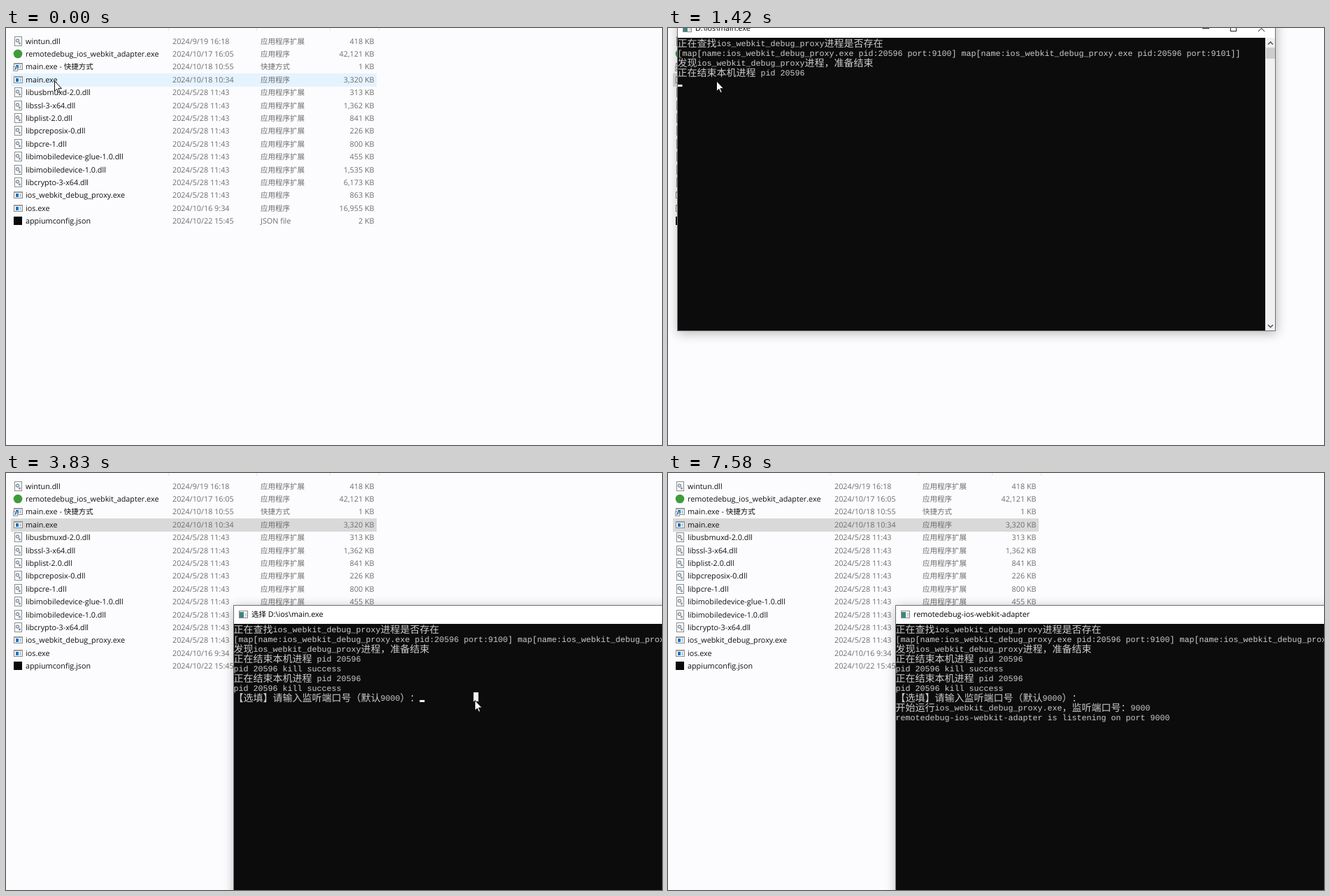
An HTML page with a canvas for the animation above (8 s loop, 938x597 px).

```html
<!DOCTYPE html>
<html lang="zh-CN">
<head>
<meta charset="utf-8">
<style>
html, body { margin: 0; width: 100%; height: 100%; overflow: hidden; background: #fcfcfe; }
canvas { display: block; }
</style>
</head>
<body>
<canvas id="stage" width="938" height="597"></canvas>
<script>
// All times are in ticks: 12 per second, 96 per loop.
const TICKS = 96, RATE = 12;
const OPEN = 14, GRAB = 28, DROP = 34, SELECT = 40, ENTER = 48, LAUNCH = 65;
const WIN_W = 856, WIN_H = 447, BAR_H = 27, CELL = 7, LINE = 14, PIVOT = 205;
const GRIP = [124, 16];
const LATIN = '"Open Sans", "Noto Sans", sans-serif';
const MONO = '"Liberation Mono", monospace';
const CJK = '"Noto Sans CJK SC", "Noto Sans CJK", sans-serif';

const stage = document.getElementById('stage').getContext('2d');
const buffer = document.createElement('canvas');
buffer.width = WIN_W;
buffer.height = WIN_H;
const pane = buffer.getContext('2d');
stage.textRendering = pane.textRendering = 'geometricPrecision';

// name | size in KB | date, if not the common one
const files = `wintun.dll|418|2024/9/19 16:18
remotedebug_ios_webkit_adapter.exe|42,121|2024/10/17 16:05
main.exe - 快捷方式|1|2024/10/18 10:55
main.exe|3,320|2024/10/18 10:34
libusbmuxd-2.0.dll|313
libssl-3-x64.dll|1,362
libplist-2.0.dll|841
libpcreposix-0.dll|226
libpcre-1.dll|800
libimobiledevice-glue-1.0.dll|455
libimobiledevice-1.0.dll|1,535
libcrypto-3-x64.dll|6,173
ios_webkit_debug_proxy.exe|863
ios.exe|16,955|2024/10/16 9:34
appiumconfig.json|2|2024/10/22 15:45`.split('\n').map(row => row.split('|'));

const types = { dll: '应用程序扩展', exe: '应用程序', json: 'JSON file', link: '快捷方式' };

const PROXY = 'ios_webkit_debug_proxy', KILL = '正在结束本机进程 pid 20596', DONE = 'pid 20596 kill success';
const ADAPTER = 'remotedebug-ios-webkit-adapter';
const entry = port => `map[name:${PROXY}.exe pid:20596 port:${port}]`;
const PROMPT = '【选填】请输入监听端口号（默认9000）：';

// [time printed, text]
const output = [
  [OPEN, `正在查找${PROXY}进程是否存在`],
  [OPEN, `[${entry(9100)} ${entry(9101)}]`],
  [OPEN, `发现${PROXY}进程，准备结束`],
  [OPEN, KILL],
  [18, DONE],
  [18, KILL],
  [21, DONE],
  [21, PROMPT],
  [56, `开始运行${PROXY}.exe，监听端口号：9000`],
  [68, `${ADAPTER} is listening on port 9000`],
];

// [time, x, y] of the pointer; the window follows it between GRAB and DROP
const path = [
  [18, 69.5, 76], [26, 137, 3], [GRAB, 137, 3], [32, 344, 157], [33, 430, 196], [DROP, 449, 205],
  [39, 670.5, 325.5], [75, 670.5, 325.5], [79, 297, 391], [85, 706, 323], [91, 900, 620],
];

const clamp = (v, lo, hi) => Math.min(hi, Math.max(lo, v));

function pointerAt(t) {
  t = clamp(t, path[0][0], path[path.length - 1][0]);
  const i = Math.max(1, path.findIndex(k => k[0] >= t));
  const [t0, x0, y0] = path[i - 1], [t1, x1, y1] = path[i], f = (t - t0) / (t1 - t0);
  return [x0 + (x1 - x0) * f, y0 + (y1 - y0) * f];
}

const isWide = c => c >= '\u2e80';

function rect(c, x, y, w, h, fill, stroke) {
  c.fillStyle = fill;
  c.fillRect(x, y, w, h);
  if (stroke) {
    c.strokeStyle = stroke;
    c.lineWidth = 1;
    c.strokeRect(x + .5, y + .5, w - 1, h - 1);
  }
}

function line(c, color, width, ...points) {
  c.strokeStyle = color;
  c.lineWidth = width;
  c.beginPath();
  points.forEach(([x, y]) => c.lineTo(x, y));
  c.stroke();
}

function disc(c, x, y, r, fill) {
  c.fillStyle = fill;
  c.beginPath();
  c.arc(x, y, r, 0, 7);
  c.fill();
}

function label(c, text, x, y, color) {
  c.fillStyle = color;
  for (const run of text.match(/[\u2e80-\uffff]+|[^\u2e80-\uffff]+/g)) {
    c.font = isWide(run) ? `10.5px ${CJK}` : `10.8px ${LATIN}`;
    c.fillText(run, x, y);
    x += c.measureText(run).width;
  }
}

function fileIcon(c, kind, name, y) {
  if (name.startsWith('remote')) return disc(c, 17, y, 6.3, '#3f9c3c');
  if (kind === 'json') return rect(c, 11, y - 6, 12, 12, '#0a0a0a');
  if (kind === 'dll') {
    rect(c, 12, y - 7, 11, 14, '#fff', '#8c8c8c');
    disc(c, 16.5, y - 1, 2.7, '#7f8fa0');
    disc(c, 16.5, y - 1, 1.3, '#fff');
    return disc(c, 19.5, y + 3, 1.7, '#8f9cab');
  }
  rect(c, 11, y - 5, 13, 10, '#fff', '#858585');
  rect(c, 11, y - 5, 13, 2, '#9a9a9a');
  rect(c, 14, y - 2, 4, 5, '#1674c4');
  rect(c, 19, y - 2, 3, 5, '#bcd0e0');
  if (kind === 'link') {
    rect(c, 10, y, 7, 7, '#fff', '#9a9a9a');
    line(c, '#1b62ad', 1.2, [12, y + 5], [15, y + 2], [12.5, y + 2]);
  }
}

function fileList(c, t) {
  rect(c, 0, 0, 938, 597, '#fcfcfe');
  for (const x of [232, 358, 463, 533]) rect(c, x, 0, 1, 4, '#e6e6e9');
  rect(c, 7, 65, 523, 19, t < 10 ? '#e5f3ff' : t < OPEN ? '#cce8ff' : '#d9d9d9');
  files.forEach(([name, size, date = '2024/5/28 11:43'], i) => {
    const y = 18.6 + i * 18.4, base = y + 4;
    const kind = name.includes(' - ') ? 'link' : name.split('.').pop();
    fileIcon(c, kind, name, Math.round(y));
    label(c, name, 28, base, '#101010');
    label(c, date, 238, base, '#6d6d6d');
    label(c, types[kind], 364, base, '#6d6d6d');
    c.textAlign = 'right';
    label(c, size + ' KB', 526.5, base, '#6d6d6d');
    c.textAlign = 'left';
  });
}

// Draws one line on the character grid and returns where it ends.
function consoleText(c, text, row) {
  const y = BAR_H + row * LINE;
  let x = .5;
  c.fillStyle = '#cccccc';
  for (const ch of text) {
    const wide = isWide(ch);
    c.font = wide ? `300 14px ${CJK}` : `11.67px ${MONO}`;
    c.fillText(ch, x, y + (wide ? 12.7 : 12));
    x += wide ? 2 * CELL : CELL;
  }
  return x;
}

function consoleBody(c, t) {
  rect(c, 0, BAR_H, 841, WIN_H - BAR_H, '#0c0c0c');
  const shown = output.filter(([start]) => t >= start);
  const ends = shown.map(([, text], i) => consoleText(c, text, i));

  // The caret waits behind the prompt, otherwise below the last line.
  const [printed, last] = shown[shown.length - 1];
  const row = last === PROMPT ? shown.length - 1 : shown.length;
  const x = last === PROMPT ? ends[row] : .5;
  if (t - printed < 7 || (t + 2) % 12 < 6) rect(c, x, BAR_H + row * LINE + 11, CELL, 3, '#f2f2f2');
  if (t >= SELECT && t < ENTER) rect(c, 49 * CELL + .5, BAR_H + 7 * LINE, CELL, 13, '#f2f2f2');
}

function consoleWindow(c, t) {
  rect(c, 0, 0, WIN_W, WIN_H, '#fff');
  rect(c, 8, 8, 13, 11, '#fff', '#8a8a8a');
  rect(c, 9, 10, 6, 8, '#3d8580');
  rect(c, 16, 11, 4, 6, '#dcdcdc');
  const prefix = t >= SELECT && t <= ENTER ? '选择 ' : '';
  label(c, t < LAUNCH ? prefix + 'D:\\ios\\main.exe' : ADAPTER, 26, 17, '#000');

  line(c, '#222', 1, [751, 13.5], [761, 13.5]);
  c.strokeRect(791.5, 9.5, 8, 8);
  line(c, '#222', 1, [831, 9], [840, 18]);
  line(c, '#222', 1, [840, 9], [831, 18]);

  consoleBody(c, t);
  rect(c, 841, BAR_H, 15, WIN_H - BAR_H, '#f0f0f0');
  rect(c, 842, 41, 13, 16, '#cdcdcd');
  line(c, '#505050', 1.5, [845, 36.5], [848.5, 33], [852, 36.5]);
  line(c, '#505050', 1.5, [845, 438], [848.5, 441.5], [852, 438]);

  c.strokeStyle = '#6e6e6e';
  c.lineWidth = 1;
  c.strokeRect(.5, .5, WIN_W - 1, WIN_H - 1);
}

// Paints the shadow only outside the window, so the fade-in stays clear.
function shadow(c) {
  c.save();
  c.beginPath();
  c.rect(-50, -50, WIN_W + 100, WIN_H + 100);
  c.rect(0, 0, WIN_W, WIN_H);
  c.clip('evenodd');
  c.shadowColor = 'rgba(0,0,0,.28)';
  c.shadowBlur = 15;
  c.shadowOffsetX = 1;
  c.shadowOffsetY = 3;
  rect(c, 0, 0, WIN_W, WIN_H, '#000');
  c.restore();
}

function placeWindow(c, t) {
  const [x, y] = pointerAt(clamp(t, GRAB, DROP)).map((v, i) => Math.round(v - GRIP[i]));
  const shown = Math.min(1, (t - OPEN + 1) / 4), scale = .95 + .05 * shown;
  consoleWindow(pane, t);
  c.save();
  c.globalAlpha = shown;
  c.translate(x + WIN_W / 2, y + PIVOT);
  c.scale(scale, scale);
  c.translate(-WIN_W / 2, -PIVOT);
  shadow(c);
  c.drawImage(buffer, 0, 0);
  c.restore();
}

function pointer(c, x, y) {
  c.beginPath();
  [[0, 0], [0, 14.5], [3.3, 11.4], [5.6, 16.6], [7.7, 15.7], [5.4, 10.6], [10, 10.6]]
    .forEach(([dx, dy]) => c.lineTo(x + dx, y + dy));
  c.closePath();
  c.fillStyle = '#fff';
  c.strokeStyle = '#111';
  c.lineWidth = 1;
  c.fill();
  c.stroke();
}

function loop() {
  // the small offset absorbs rounding at tick borders
  const t = Math.floor((performance.now() + 5) * RATE / 1000) % TICKS;
  fileList(stage, t);
  if (t >= OPEN) placeWindow(stage, t);
  pointer(stage, ...pointerAt(t));
  requestAnimationFrame(loop);
}
loop();
</script>
</body>
</html>
```
